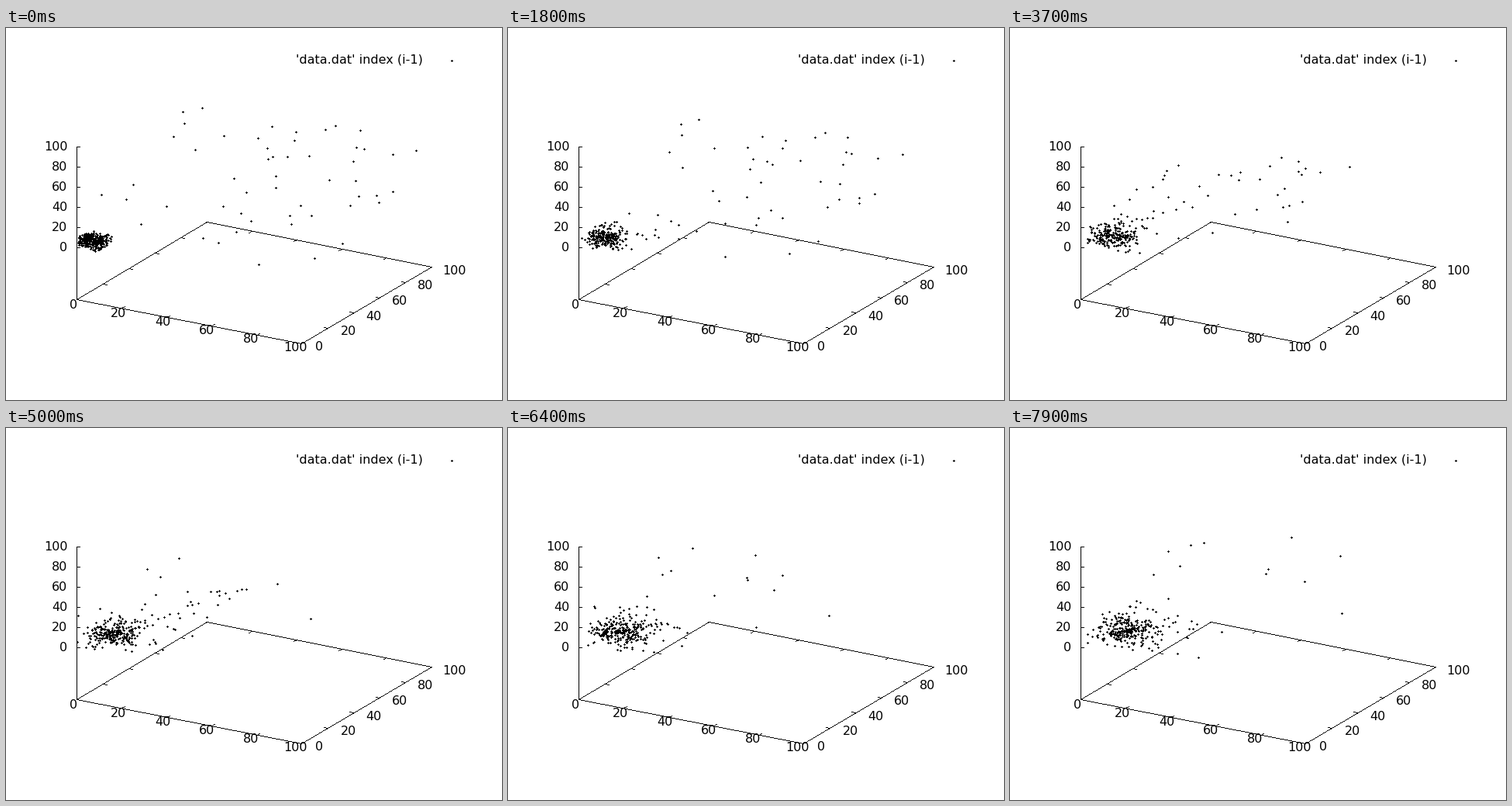
These frames come from a looping animation (640x480 px, 8 s). A matplotlib script:

```python
import numpy as np
import matplotlib.pyplot as plt
from matplotlib.animation import FuncAnimation

W, H, DPI = 640, 480, 100
FRAMES, STEP, SUB = 80, 0.1, 10
rng = np.random.default_rng(11)

# Screen vectors of the three axes per data unit
AXES = np.array([(2.9, 0.57), (1.68, -1.0), (0, -1.3)])
ZERO = np.array([91, 283])

N_CORE, N_STRAY, N_FLUNG = 310, 52, 10
CORE_MASS, STAR_MASS, SOFT = 5.3e4, 130, 12

cube = rng.uniform(-5, 5, (N_CORE, 3))
swing = rng.normal(size=(N_CORE, 3)) * (3 + 4 * rng.exponential(size=(N_CORE, 1)))
radius2 = (swing ** 2).sum(axis=1, keepdims=True)
rate = np.sqrt(CORE_MASS / (radius2 + 64) ** 1.5)

aim = np.abs(rng.normal(size=(N_FLUNG, 3))) + 0.1
aim /= np.linalg.norm(aim, axis=1, keepdims=True)
reach = rng.uniform(45, 120, (N_FLUNG, 1))
launch = np.linspace(0.8, 5, N_FLUNG)[:, None]


def core_center(t):
    return np.full(3, 5 + t)


def pull(gap, mass):
    r2 = (gap ** 2).sum(axis=-1, keepdims=True) + SOFT ** 2
    return mass * gap / r2 ** 1.5


def fall():
    """Scattered stars, at rest at first, drawn into the core."""
    pos = rng.uniform(2, 100, (N_STRAY, 3))
    vel, path, dt = np.zeros_like(pos), [], STEP / SUB
    for k in range(FRAMES * SUB):
        if k % SUB == 0:
            path.append(pos.copy())
        gap = core_center(k * dt) - pos
        acc = pull(gap, CORE_MASS)
        acc += pull(pos[None] - pos[:, None], STAR_MASS).sum(axis=1)
        r2 = (gap ** 2).sum(axis=1, keepdims=True)
        drag = 1 / (1 + r2 / 25 ** 2) ** 2
        vel += (acc - drag * vel) * dt
        pos += vel * dt
    return path


def core(t):
    """Swarm that swells out of a small cube."""
    orbit = cube * np.cos(rate * t) + swing * np.sin(rate * t)
    return core_center(t) + (1 + 0.1 * t) * orbit


def flung(t):
    """Stars thrown out of the core one after another."""
    age = np.maximum(t - launch, 0)
    return core_center(t) + reach * (1 - np.exp(-age / 1.8)) * aim


def visible(p):
    inside = ((p >= 0) & (p <= 100)).all(axis=1)
    return ZERO + p[inside] @ AXES


def line(img, a, b):
    n = int(np.abs(np.subtract(b, a)).max())
    x, y = np.rint(np.linspace(a, b, n + 1)).astype(int).T
    img[y, x] = 0


def crosses(img, pts):
    x, y = np.rint(pts).astype(int).T
    for dx, dy in ((0, 0), (1, 0), (-1, 0), (0, 1), (0, -1)):
        img[y + dy, x + dx] = 0


def ticks(img, a, b, step):
    for p in np.rint(np.linspace(a, b, 6)):
        line(img, p, p + step)


def draw_box():
    img = np.ones((H, W))
    left, front, right, back = (91, 350), (381, 407), (549, 308), (259, 250)
    for a, b in ((left, front), (front, right), (right, back), (back, left)):
        line(img, a, b)
    line(img, (91, 153), left)
    ticks(img, left, front, (4, -2))
    ticks(img, back, right, (-4, 2))
    ticks(img, left, back, (5, 1))
    ticks(img, front, right, (-5, -1))
    ticks(img, (91, 283), (91, 153), (4, 0))
    crosses(img, [(575, 42)])
    return img


fig = plt.figure(figsize=(W / DPI, H / DPI), dpi=DPI, facecolor="white")
ax = fig.add_axes([0, 0, 1, 1])
ax.axis("off")

box = draw_box()
view = ax.imshow(box, cmap="gray", vmin=0, vmax=1, interpolation="nearest",
                 extent=(0, W, H, 0), aspect="auto")


def label(x, y, text, ha="center"):
    ax.text(x, y + 5, text, ha=ha, va="baseline", family="DejaVu Sans",
            fontsize=16 * 72 / DPI, color="black")


for i in range(6):
    text = str(20 * i)
    width = 5 * (len(text) - 1)
    label(79.5, 283 - 26 * i, text, "right")
    label(87.5 + 57.2 * i, 357 + 11 * i, text)
    label(398.5 + 33 * i, 411 - 19.7 * i, text, "left")
label(537.5, 41, "'data.dat' index (i-1)", "right")

strays = fall()


def update(k):
    t = k * STEP
    img = box.copy()
    crosses(img, visible(np.vstack([strays[k], core(t), flung(t)])))
    view.set_data(img)
    return (view,)


anim = FuncAnimation(fig, update, frames=FRAMES, interval=100, repeat=True,
                     repeat_delay=0)
plt.show()
```
